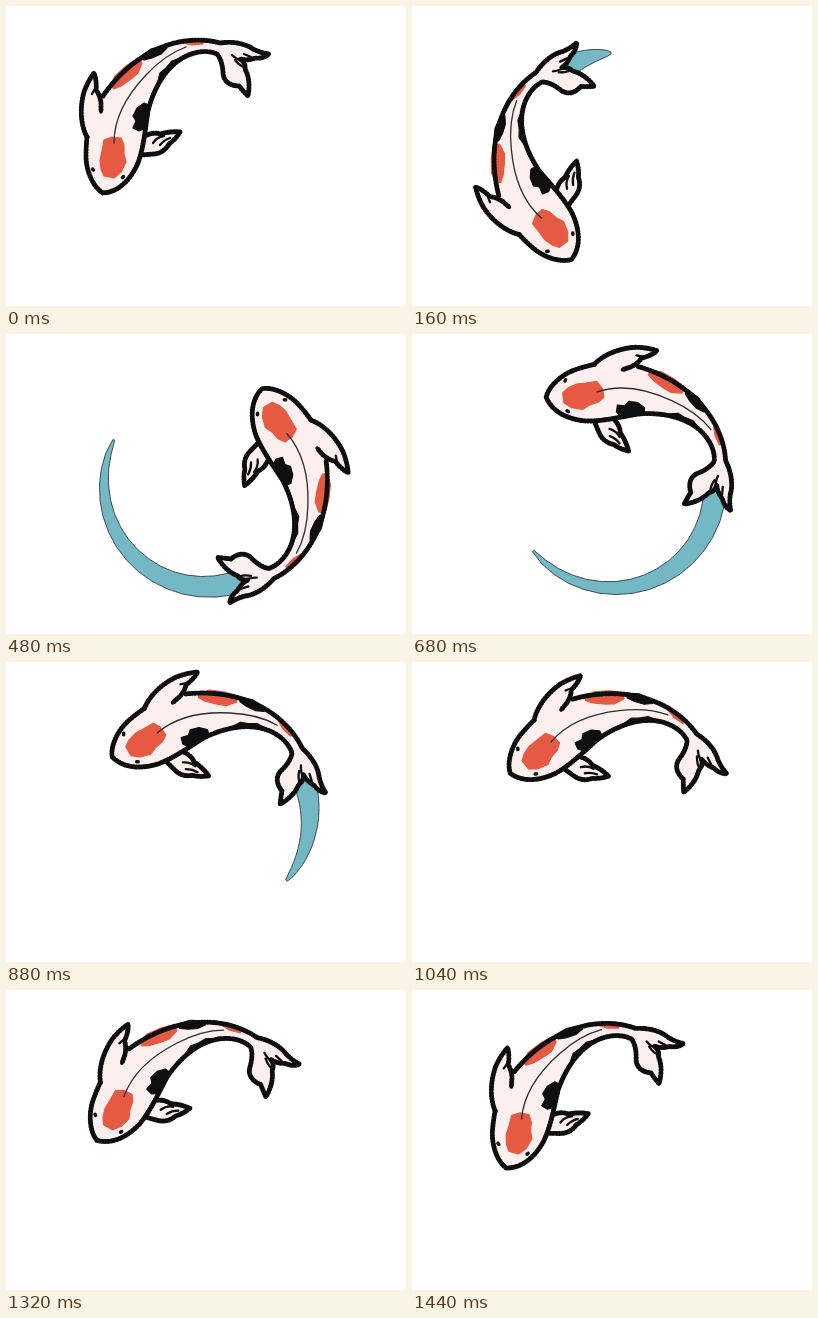
These frames come from a looping animation (400x300 px, 1480 ms). An HTML page:

```html
<!DOCTYPE html>
<html lang="en">
<head>
<meta charset="utf-8">
<title>Koi</title>
<style>
  html, body { margin: 0; width: 100%; height: 100%; overflow: hidden; background: #fff; }
  svg { display: block; width: 100vw; height: 100vh; }
  path { stroke-linecap: round; stroke-linejoin: round; }
  .skin { fill: #fcf0ef; }
  .line { fill: none; stroke: #100f0f; stroke-width: 3.5; }
  .fuzz { fill: none; stroke: #100f0f; stroke-width: 4.9; stroke-dasharray: 1 2; }
  .fuzz path, .fuzz { stroke-linecap: butt; }
  .thin { fill: none; stroke: #100f0f; stroke-width: 2.3; }
  .spine { fill: none; stroke: #2b2f31; stroke-width: 1.3; }
  .red { fill: #e65a44; stroke: #e65a44; stroke-width: 1.2; }
  .ink { fill: #100f0f; stroke: #100f0f; stroke-width: 1.2; }
  #trail { fill: #74b8c6; stroke: #1d2426; stroke-width: .8; stroke-dasharray: 2.5 .8; }
</style>
</head>
<body>
<svg viewBox="0 0 400 300">
  <defs>
    <path id="body" d="M97 90 C112 68 135 47 165 38 C182 33 200 33 214 37 C228 35 240 38 247 43 Q255 47 263 48 Q257 53 249 52 Q242 55 234 53 Q240 57 239 63 Q245 74 242 90 Q237 85 233 80 C225 80 217 76 217 66 Q216 54 211 48 C200 43 184 46 172 55 C157 66 147 85 142 105 C139 125 138 140 132 157 C125 173 113 186 97 187 C88 182 80 166 80 150 Q80 140 81 131"/>
    <path id="side" d="M81 131 C74 118 74 100 78 86 Q82 75 88 67 Q91 75 90 84 Q94 89 95 97 L95 106"/>
    <path id="inner" d="M141 129 Q148 126 154 128 Q165 125 174 126 Q169 134 163 138 Q158 147 148 148 L135 149"/>
  </defs>
  <path id="trail"/>
  <g id="fish">
    <use href="#inner" class="skin"/>
    <use href="#inner" class="fuzz"/>
    <use href="#inner" class="line"/>
    <path class="thin" d="M147 137 Q151 131 158 130 M154 139 Q158 134 164 132"/>

    <use href="#body" class="skin"/>
    <path class="red" d="M98 134 L106 131 L115 132 L118 139 L118 148 L120 156 L115 166 L108 172 L98 170 L95 163 L94 154 L96 145Z"/>
    <path class="red" d="M105 80 L109 70 L120 60 L132 52 L136 57 L132 67 L125 73 L115 80 L108 83Z"/>
    <path class="red" d="M176 37 L186 35 L197 36 L197 38 L186 39Z"/>
    <path class="ink" d="M134 51 L145 43 L158 39 L161 42 L155 48 L146 52 L138 54Z"/>
    <path class="ink" d="M152 75 L154 67 L160 62 L166 55 L174 52 L170 58 L162 66Z"/>
    <path class="ink" d="M131 102 L138 97 L143 99 L142 108 L138 123 L133 125 L127 122 L130 115 L127 110Z"/>
    <path class="spine" d="M108 137 C108 112 120 90 140 69 C152 56 166 46 180 41"/>
    <use href="#body" class="fuzz"/>
    <use href="#body" class="line"/>
    <path class="thin" d="M226 49 Q231 54 239 56 M229 54 Q234 60 238 61 M238 48 L245 51"/>

    <use href="#side" class="skin"/>
    <use href="#side" class="fuzz"/>
    <use href="#side" class="line"/>
    <path class="thin" d="M86 88 Q88 84 90 82"/>
    <path class="line" d="M86.5 163 L87.5 164 M116.5 171.5 L117.5 170.5"/>
  </g>
</svg>
<script>
const LOOP = 1480, STEP = 40, CX = 201.5, CY = 151;
const fish = document.getElementById('fish');
const trail = document.getElementById('trail');

// Keys: time (ms), angle (deg), speed (deg/ms)
const turn = [[0, 0, -.12], [320, -133.5, -.57], [480, -221.5, -.48], [680, -288.5, -.18],
  [880, -310.5, -.07], [1200, -329.4, -.07], [1480, -360, -.12]];
const wake = [[0, 290, -.1], [320, 240, -.19], [480, 205.7, -.26], [680, 140.7, -.41],
  [880, 40.6, -.58], [1000, -31, -.6], [1480, -320, -.6]];

function hermite(keys, t) {
  let i = 0;
  while (i < keys.length - 2 && t >= keys[i + 1][0]) i++;
  const [t0, a, va] = keys[i], [t1, b, vb] = keys[i + 1];
  const d = t1 - t0, s = (t - t0) / d, r = 1 - s;
  return a + (b - a) * s * s * (3 - 2 * s) + d * s * r * (va * r - vb * s);
}

function polar(deg, r) {
  const a = deg * Math.PI / 180;
  return (CX + r * Math.cos(a)).toFixed(1) + ' ' + (CY + r * Math.sin(a)).toFixed(1);
}

// Tapered crescent from its thin end to the tail of the fish
function crescent(end, head) {
  if (end - head < 2) return '';
  const n = 16, outer = [], inner = [];
  for (let i = 0; i <= n; i++) {
    const f = i / n, deg = end + (head - end) * f;
    const mid = 104 - 2.5 * f, half = 1 + 10.5 * f ** .65;
    outer.push(polar(deg, mid + half));
    inner.unshift(polar(deg, mid - half));
  }
  return 'M' + outer.concat(inner).join('L') + 'Z';
}

function draw(now) {
  const t = Math.floor(now % LOOP / STEP) * STEP;
  const rot = hermite(turn, t);
  fish.setAttribute('transform', `rotate(${rot.toFixed(2)} ${CX} ${CY})`);
  trail.setAttribute('d', crescent(hermite(wake, t), 290 + rot));
}

const start = performance.now();
function tick() {
  draw(performance.now() - start);
  requestAnimationFrame(tick);
}
tick();
</script>
</body>
</html>
```
